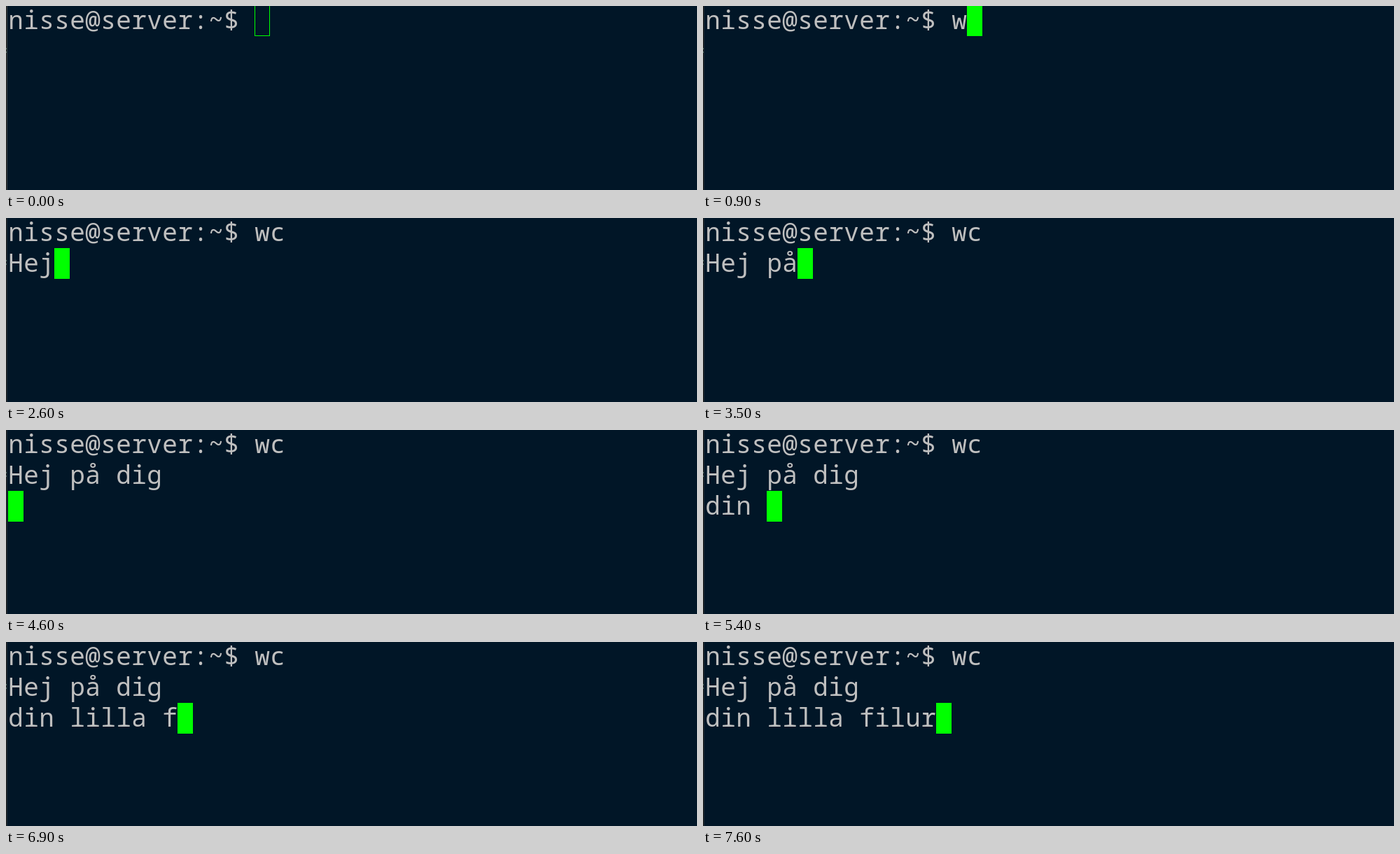
Animation of 987 by 263 pixels, one loop 8000 ms. Source, as an HTML page with a canvas:

```html
<!DOCTYPE html>
<html lang="sv">
<head>
<meta charset="utf-8">
<title>Terminal</title>
<style>
  html, body { margin: 0; width: 100%; height: 100%; overflow: hidden; background: #011627; }
  canvas { display: block; }
</style>
</head>
<body>
<canvas id="term" width="987" height="263"></canvas>
<script>
const ctx = document.getElementById('term').getContext('2d');
const LOOP = 8000, FOCUS = 200;
const WIDTH = 987, HEIGHT = 263;
const CELL_W = 22, CELL_H = 44, LEFT = 3, TOP = -1, BASE = 34;
const PROMPT = 'nisse@server:~$ ';

// Each run: the keys and the time each one is pressed
const runs = [
  ['wc\n', 900, 1200, 1500],
  ['Hej', 2200, 2400, 2600],
  [' på', 3200, 3400, 3500],
  [' d', 3800, 4000],
  ['ig\n', 4300, 4400, 4600],
  ['din', 4800, 5000, 5200],
  [' lilla ', 5400, 5600, 5700, 5900, 6100, 6200, 6400],
  ['fil', 6800, 7000, 7100],
  ['ur', 7400, 7600]
];
const keys = runs.flatMap(([text, ...times]) =>
  [...text].map((char, i) => ({ char, time: times[i] })));

function box(x, y, w, h, color) {
  ctx.fillStyle = color;
  ctx.fillRect(x, y, w, h);
}

function drawWindow(focused) {
  box(0, 0, WIDTH, HEIGHT, '#011627');
  // Edge of the neighbouring pane, then the window border
  box(0, 0, 1, HEIGHT, '#1a1c1e');
  box(0, 60, 1, 2, '#557066');
  box(0, 65, 1, 2, '#557066');
  box(1, 0, 1, HEIGHT, focused ? '#1c2831' : '#3b3f42');
}

function drawCursor(col, row, focused) {
  const x = LEFT + col * CELL_W, y = TOP + row * CELL_H;
  if (focused) return box(x, y, CELL_W, CELL_H, '#00ff00');
  ctx.strokeStyle = '#00ff00';
  ctx.lineWidth = 1;
  ctx.strokeRect(x + 0.5, y + 0.5, CELL_W - 1, CELL_H - 1);
}

function draw(t) {
  const focused = t >= FOCUS;
  drawWindow(focused);

  const typed = keys.filter(k => k.time <= t).map(k => k.char).join('');
  const lines = (PROMPT + typed).split('\n');
  ctx.font = '36px "Noto Sans Mono", "DejaVu Sans Mono", monospace';
  ctx.textAlign = 'center';
  ctx.textBaseline = 'alphabetic';
  ctx.fillStyle = '#bfbfbf';
  lines.forEach((line, row) => [...line].forEach((char, col) =>
    ctx.fillText(char, LEFT + (col + 0.5) * CELL_W, TOP + row * CELL_H + BASE)));

  const row = lines.length - 1;
  drawCursor(lines[row].length, row, focused);
}

const start = performance.now();
function tick() {
  draw((performance.now() - start) % LOOP);
  requestAnimationFrame(tick);
}
tick();
</script>
</body>
</html>
```
